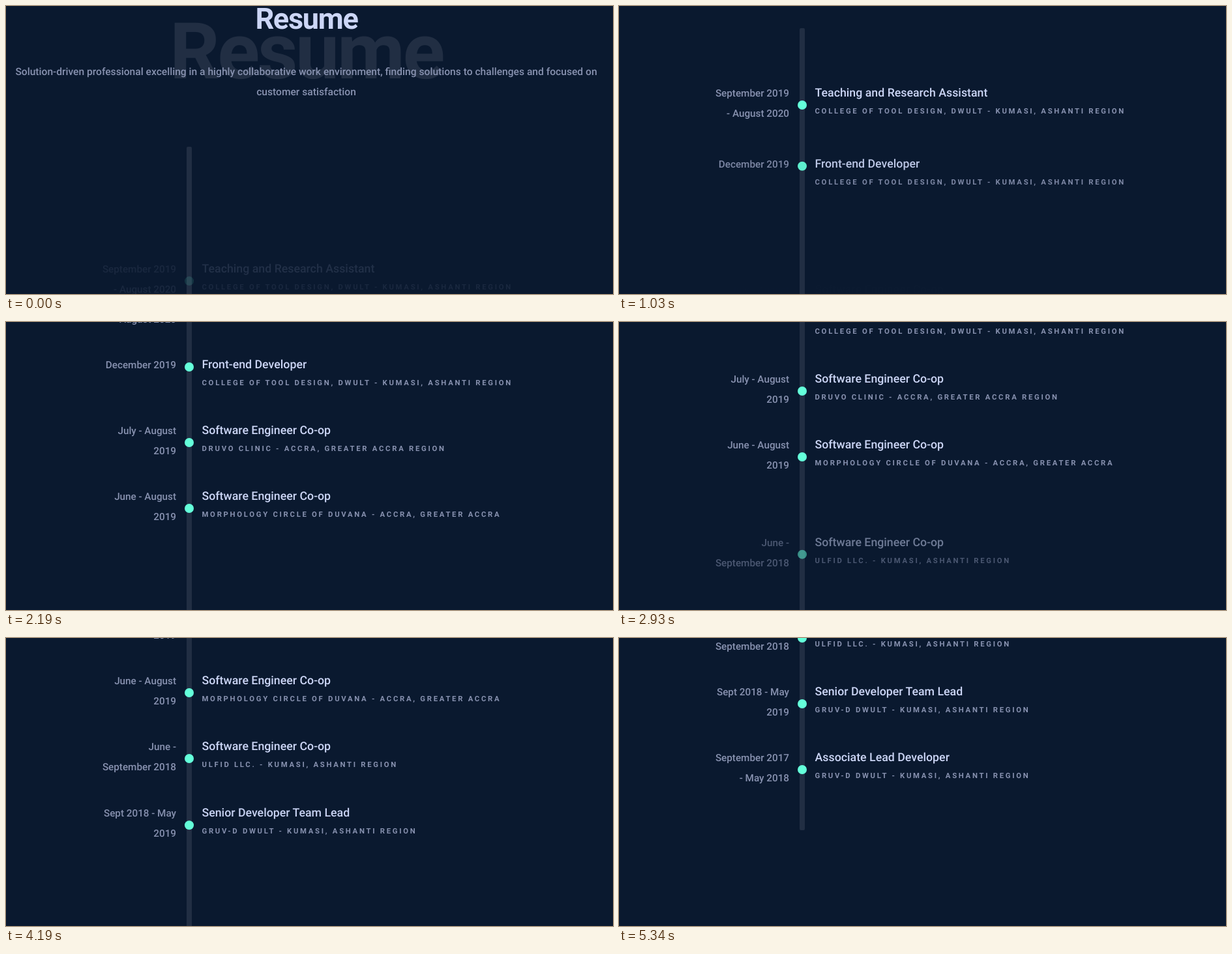
Recreate the animation shown at these times as an HTML page. Size 931 by 442 pixels, loop 5.43 s.

```html
<!DOCTYPE html>
<html lang="en">
<head>
<meta charset="utf-8">
<title>Resume timeline</title>
<style>
  html, body { margin: 0; width: 100%; height: 100%; overflow: hidden; background: #0a192f; }
  svg { display: block; width: 931px; height: 442px; font-family: Roboto, "Liberation Sans", sans-serif; text-rendering: geometricPrecision; }
  .big { font-weight: 700; letter-spacing: -.028em; }
  .intro { font-size: 15.6px; font-weight: 500; text-anchor: middle; fill: #8892b0; }
  .date { font-size: 15.25px; font-weight: 500; text-anchor: end; fill: #8892b0; }
  .title { font-size: 17.75px; font-weight: 500; fill: #ccd6f6; }
  .place { font-size: 11.3px; font-weight: 700; letter-spacing: 2.72px; fill: #8892b0; }
  .track { fill: #212e43; }
  .dot { fill: #64ffda; }
</style>
</head>
<body>
<svg viewBox="0 0 931 442">
  <g id="page">
    <text class="big track" x="251" y="111" font-size="120">Resume</text>
    <text class="big" x="382.4" y="35" font-size="45" fill="#ccd6f6">Resume</text>
    <text class="intro" x="460.5" y="106">Solution-driven professional excelling in a highly collaborative work environment, finding solutions to challenges and focused on</text>
    <text class="intro" x="460.5" y="137">customer satisfaction</text>
    <rect class="track" x="277" y="216" width="8" height="817" rx="2"/>
  </g>
</svg>
<script>
const LOOP = 5430;
const FIRST_Y = 315, PITCH = 101;
// a job fades in and rises once its resting place scrolls above TRIGGER_Y
const FADE = 800, RISE = 100, TRIGGER_Y = 360, DELAY = 40;

const college = 'COLLEGE OF TOOL DESIGN, DWULT - KUMASI, ASHANTI REGION';
const club = 'GRUV-D DWULT - KUMASI, ASHANTI REGION';
const jobs = [
  [['September 2019', '- August 2020'], 'Teaching and Research Assistant', college],
  [['December 2019'], 'Front-end Developer', college],
  [['July - August', '2019'], 'Software Engineer Co-op', 'DRUVO CLINIC - ACCRA, GREATER ACCRA REGION'],
  [['June - August', '2019'], 'Software Engineer Co-op', 'MORPHOLOGY CIRCLE OF DUVANA - ACCRA, GREATER ACCRA'],
  [['June -', 'September 2018'], 'Software Engineer Co-op', 'ULFID LLC. - KUMASI, ASHANTI REGION'],
  [['Sept 2018 - May', '2019'], 'Senior Developer Team Lead', club],
  [['September 2017', '- May 2018'], 'Associate Lead Developer', club]
];

// wheel strokes; the first is already under way when the loop starts
const SCROLL_FROM = -49;
const strokes = [
  { at: -172, time: 300, by: 80 },
  { at: 350, time: 300, by: 80 },
  { at: 832, time: 430, by: 160 },
  { at: 1880, time: 310, by: 80 },
  { at: 2580, time: 360, by: 79 },
  { at: 3330, time: 330, by: 81 },
  { at: 3930, time: 260, by: 42 },
  { at: 4420, time: 600, by: 185 }
];

const clamp = x => Math.min(1, Math.max(0, x));
const smooth = x => x * x * (3 - 2 * x);

function scrollAt(t) {
  return strokes.reduce((sum, s) => sum + s.by * smooth(clamp((t - s.at) / s.time)), SCROLL_FROM);
}

function fadeStart(y) {
  let t = strokes[0].at;
  while (t < LOOP && y - scrollAt(t) > TRIGGER_Y) t++;
  return t + DELAY;
}

// cubic-bezier(.25, .1, .25, 1)
function ease(x) {
  const curve = (u, a, b) => 3 * u * (1 - u) ** 2 * a + 3 * u * u * (1 - u) * b + u ** 3;
  let lo = 0, hi = 1;
  for (let i = 0; i < 20; i++) {
    const mid = (lo + hi) / 2;
    if (curve(mid, .25, .25) < x) lo = mid; else hi = mid;
  }
  return curve(lo, .1, 1);
}

function add(parent, tag, attrs, text = '') {
  const el = document.createElementNS('http://www.w3.org/2000/svg', tag);
  for (const key in attrs) el.setAttribute(key, attrs[key]);
  el.textContent = text;
  return parent.appendChild(el);
}

const rows = jobs.map(([dates, title, place], i) => {
  const el = add(page, 'g', {}), y = FIRST_Y + PITCH * i;
  dates.forEach((d, n) => add(el, 'text', { class: 'date', x: 261, y: 6 + 31 * n }, d));
  add(el, 'circle', { class: 'dot', cx: 281, cy: dates.length > 1 ? 19 : 4, r: 7 });
  add(el, 'text', { class: 'title', x: 300.5, y: 6 }, title);
  add(el, 'text', { class: 'place', x: 300.5, y: 32 }, place);
  return { el, y, start: fadeStart(y) };
});

function draw(t) {
  page.setAttribute('transform', `translate(0 ${-Math.round(scrollAt(t))})`);
  for (const { el, start, y } of rows) {
    const p = ease(clamp((t - start) / FADE));
    el.setAttribute('opacity', p);
    el.setAttribute('transform', `translate(0 ${y + RISE * (1 - p)})`);
  }
}

const begin = performance.now();
function tick() {
  draw((performance.now() - begin) % LOOP);
  requestAnimationFrame(tick);
}
tick();
</script>
</body>
</html>
```
